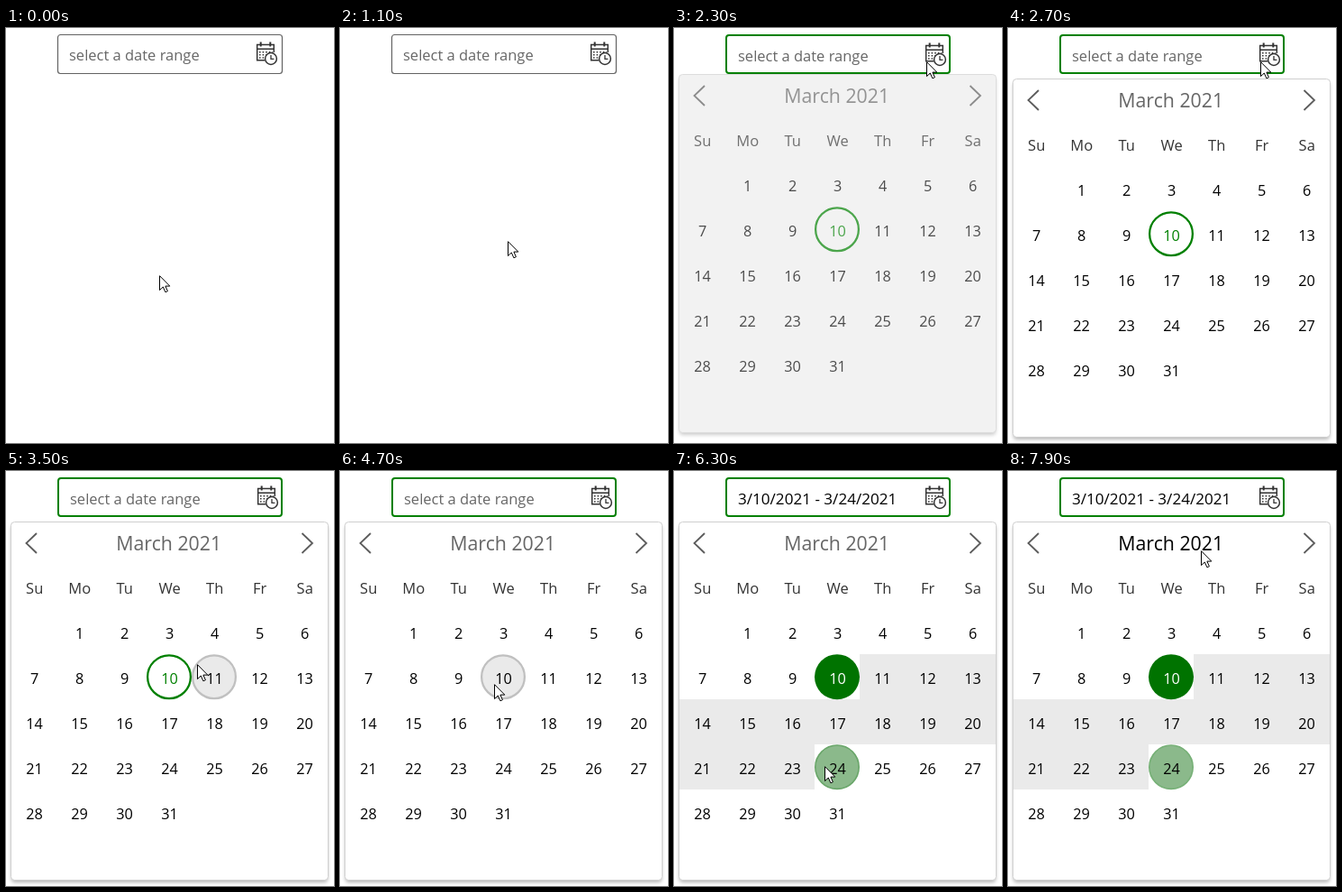
Write an HTML page that moves like this. It is 364 by 460 pixels and loops after 8 s.

```html
<!DOCTYPE html>
<html lang="en">
<head>
<meta charset="utf-8">
<title>Date range picker</title>
<style>
html, body { margin: 0; width: 100%; height: 100%; overflow: hidden; background: #fff; }
svg { display: block; width: 364px; height: 460px; font-family: "Open Sans", "Noto Sans", sans-serif; }
.mid { text-anchor: middle; }
</style>
</head>
<body>
<svg viewBox="0 0 364 460">
  <defs>
    <filter id="soft" x="-5%" y="-5%" width="110%" height="110%"><feGaussianBlur stdDeviation="2.2"/></filter>
    <clipPath id="below"><rect y="51" width="364" height="409"/></clipPath>
  </defs>
  <rect id="box" fill="#fff"/>
  <rect id="button" x="271" y="8.5" width="35" height="41.5" fill="#f3f3f3"/>
  <g id="content">
    <text id="value" x="70" y="36"></text>
    <g fill="none" stroke="#333" stroke-width="1.5">
      <path d="M287 35.8H278.7V18.4H297.3V27M278.7 23.3H297.3"/>
      <path d="M282.7 15.5V20.5M293.3 15.5V20.5" stroke-width="2"/>
      <path d="M281 26.7H296M281 29.8H289M281 32.9H287" stroke-dasharray="1.6 2"/>
      <circle cx="294" cy="34" r="6.4" fill="#fff"/>
      <path d="M294 30V34.4H297.4" stroke-width="1.3"/>
    </g>
  </g>
  <g clip-path="url(#below)">
    <g id="popup">
      <rect x="6" y="60" width="351" height="396" rx="4" fill="#000" opacity=".3" filter="url(#soft)"/>
      <rect id="panel" x="5.5" y="56.5" width="352" height="397" rx="4" stroke="#cfcfcf"/>
      <g id="range" fill="#eaeaea">
        <rect x="206" y="203" width="151" height="50"/>
        <rect x="6" y="253" width="351" height="50"/>
        <rect x="6" y="303" width="150" height="50"/>
      </g>
      <path d="M34 69L22.5 80L34 91M328.5 69L340 80L328.5 91" fill="none" stroke="#5c5c5c" stroke-width="1.8"/>
      <text id="title" class="mid" x="180.7" y="88" font-size="21.3">March 2021</text>
      <g id="days" class="mid"></g>
    </g>
  </g>
  <path id="cursor" d="M.5 .7V16.6L4.3 13L6.9 18.8L9.4 17.7L6.9 12.1H11.8Z" fill="#fff" stroke="#000"/>
</svg>
<script>
const LOOP = 8000, STEP = 100;
const OPEN = 2100, PICK_START = 4800, PICK_END = 6300;
const GREEN = '#008000';
const $ = id => document.getElementById(id);

// time, x, y of the pointer tip
const PATH = [
  [0, 170, 274], [900, 170, 274], [1350, 225, 150], [1700, 277, 60], [1900, 280, 37],
  [2900, 280, 37], [3200, 265, 125], [3500, 212, 214], [3800, 171, 236],
  [4800, 171, 236], [5300, 178, 280], [5600, 179, 308], [5900, 167, 327],
  [7500, 167, 327], [7700, 195, 200], [7900, 214, 88], [8000, 214, 88]
];

function set(el, attrs) {
  for (const key in attrs) el.setAttribute(key, attrs[key]);
}

function add(parent, tag, attrs, text = '') {
  const el = document.createElementNS('http://www.w3.org/2000/svg', tag);
  set(el, attrs);
  el.textContent = text;
  return parent.appendChild(el);
}

['Su', 'Mo', 'Tu', 'We', 'Th', 'Fr', 'Sa'].forEach((name, col) =>
  add($('days'), 'text', { x: 31.7 + 50 * col, y: 136, 'font-size': 16.5, fill: '#333' }, name));

const cells = Array.from({ length: 31 }, (_, i) => {
  const day = i + 1, col = day % 7, row = Math.floor(day / 7);
  const x = 31 + 50 * col, y = 178 + 50 * row;
  return {
    day, x, y,
    disc: add($('days'), 'circle', { cx: x, cy: y + .2 }),
    label: add($('days'), 'text', { x: x + .6, y: y + 8, 'font-size': 16.3 }, day)
  };
});

// Tangents vanish wherever the pointer rests.
function slope(i, axis) {
  const a = PATH[i - 1], b = PATH[i], c = PATH[i + 1];
  const same = (p, q) => p[1] === q[1] && p[2] === q[2];
  if (!a || !c || same(a, b) || same(b, c)) return 0;
  return (c[axis] - a[axis]) / (c[0] - a[0]);
}

function pointer(t) {
  const i = PATH.findIndex((p, k) => k + 1 < PATH.length && t < PATH[k + 1][0]);
  const a = PATH[i], b = PATH[i + 1], span = b[0] - a[0], u = (t - a[0]) / span;
  return [1, 2].map(axis => Math.round(
    a[axis] * (1 + 2 * u) * (1 - u) ** 2 + b[axis] * u * u * (3 - 2 * u) +
    span * (slope(i, axis) * u * (1 - u) ** 2 - slope(i + 1, axis) * u * u * (1 - u))));
}

function look(day, hover, t) {
  if (day === 10 && t >= PICK_START) return { fill: '#007300', stroke: 'none', r: 25, ink: '#fff' };
  if (day === 24 && t >= PICK_END) return { fill: '#8bb98b', stroke: hover ? '#69a669' : '#76b076', r: 24.2, ink: '#000' };
  if (hover) return { fill: '#eaeaea', stroke: '#c0c0c0', r: 23.9, ink: '#000' };
  if (day === 10) return { fill: 'none', stroke: GREEN, r: 23.9, ink: GREEN };
  return { fill: 'none', stroke: 'none', r: 24, ink: '#000' };
}

function drawInput(t, x, y) {
  const open = t >= OPEN, done = t >= PICK_END;
  set($('box'), open
    ? { x: 58, y: 8, width: 248, height: 42, rx: 3, stroke: GREEN, 'stroke-width': 2 }
    : { x: 57.5, y: 7.5, width: 249, height: 43, rx: 3, stroke: '#636363', 'stroke-width': 1.2 });
  set($('button'), { opacity: !open && x >= 271 && y >= 8 && y <= 50 ? 1 : 0 });
  set($('content'), { transform: open ? 'translate(1 1)' : '' });
  set($('value'), { fill: done ? '#000' : '#666', 'font-size': done ? 17.1 : 16.5 });
  $('value').textContent = done ? '3/10/2021 - 3/24/2021' : 'select a date range';
}

function drawPopup(t, x, y) {
  const p = Math.min(1, Math.max(0, (t - OPEN) / 400));
  const tone = Math.round(255 - 72 * p * (1 - p));
  set($('popup'), {
    opacity: Math.min(1, 1.4 * p),
    transform: `translate(0 ${-40 * (1 - p) ** 3})`
  });
  set($('panel'), { fill: `rgb(${tone},${tone},${tone})` });
  set($('range'), { opacity: t >= PICK_END ? 1 : 0 });
  set($('title'), { fill: p === 1 && Math.abs(x - 181) < 70 && y > 64 && y < 106 ? '#000' : '#666' });
  for (const c of cells) {
    const hover = p === 1 && Math.abs(x - c.x) < 25 && Math.abs(y - c.y) < 25;
    const { fill, stroke, r, ink } = look(c.day, hover, t);
    set(c.disc, { fill, stroke, r, 'stroke-width': r > 24 ? 1.6 : 2.3 });
    set(c.label, { fill: ink });
  }
}

function draw(time) {
  const t = Math.floor((time % LOOP) / STEP) * STEP;
  const [x, y] = pointer(t);
  drawInput(t, x, y);
  drawPopup(t, x, y);
  set($('cursor'), { transform: `translate(${x} ${y})` });
}

const start = performance.now();
function tick() {
  draw(performance.now() - start);
  requestAnimationFrame(tick);
}
tick();
</script>
</body>
</html>
```
